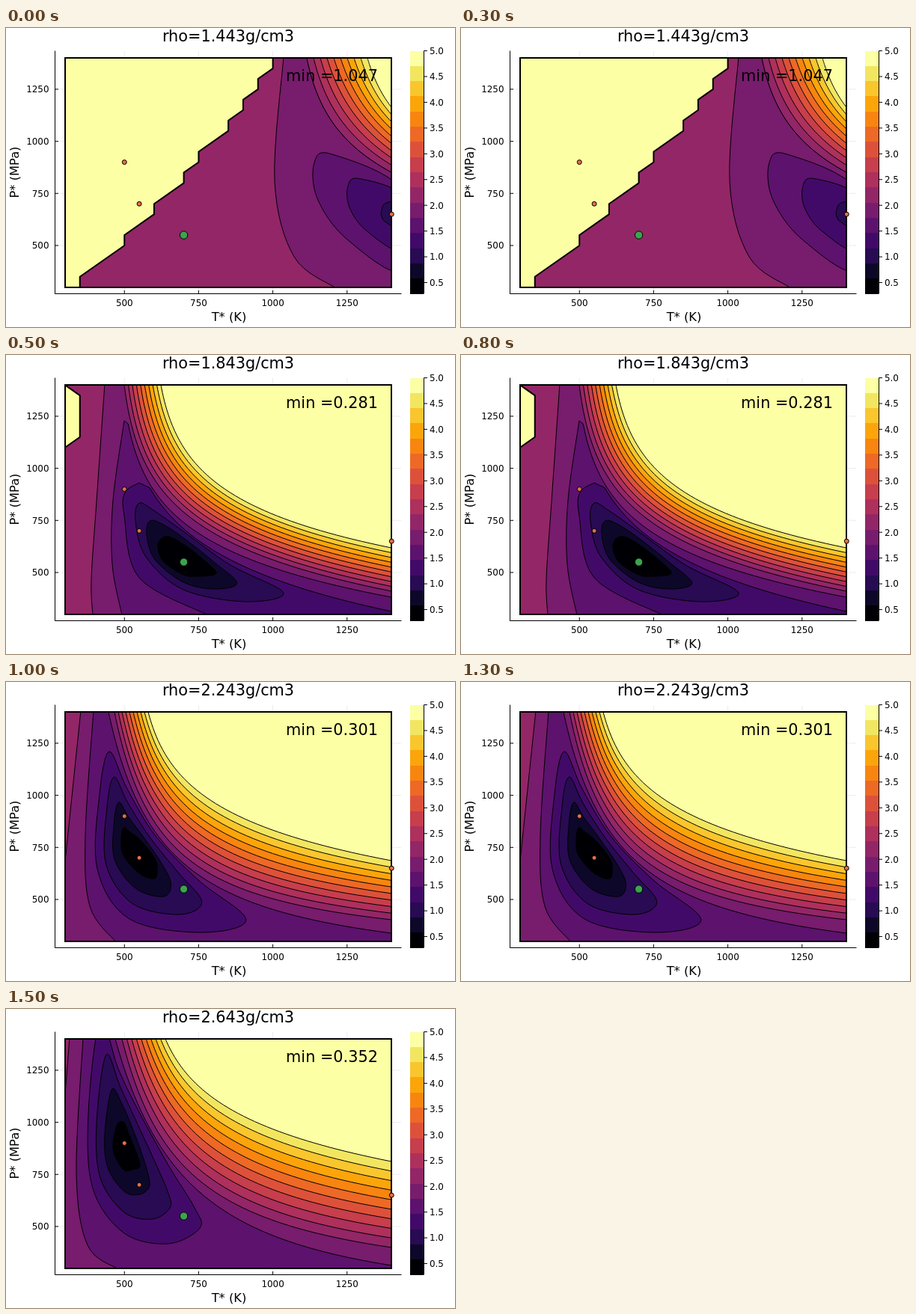
Animation of 600x400 px, one loop 2000 ms. Source, as an HTML page with a canvas:

```html
<!DOCTYPE html>
<html lang="en">
<head>
<meta charset="utf-8">
<title>Density contours</title>
<style>
html, body { margin: 0; width: 100%; height: 100%; overflow: hidden; background: #fff; }
canvas { display: block; width: 600px; height: 400px; }
</style>
</head>
<body>
<canvas id="stage" width="600" height="400"></canvas>
<script>
const ctx = document.getElementById('stage').getContext('2d');
const INFERNO = ['#000004', '#0d0829', '#280b53', '#420a68', '#5d126e', '#781c6d', '#932667', '#ae305c',
  '#c73e4c', '#dd513a', '#ed6925', '#f8850f', '#fca50a', '#fac62d', '#f2e661', '#fcffa4'];
const BASE = 6;
const PLOT = { left: 79, top: 40, right: 515, bottom: 347 };
const OUTSIDE = { x: 530, top: 25, bottom: 360 };
const STEP_MS = 500;

const parse = text => text.split(' ').map(pair => pair.split(',').map(Number));
const mix = (a, b, t) => a + (b - a) * t;
const clamp = (v, lo, hi) => Math.min(hi, Math.max(lo, v));
const xOf = kelvin => 78.9 + (kelvin - 300) * 0.3967;
const yOf = mpa => 346.7 - (mpa - 300) * 0.2787;
const cell = (i, j) => [xOf(300 + 50 * i), yOf(300 + 50 * j)];

// Each ramp is [x at the plot top, y at the right edge, softness, power].
// slopes: left edge of a region and the ramp that bounds it above, from level 5 inward.
// pool: outermost and innermost loop of the minimum; fan: lowest and highest ramp.
const SCENES = [
  {
    rho: '1.443', min: '1.047',
    slopes: [{ edge: '441,348 385,306 359,205 371,38', ramp: [402, 193, 0.13, 0.02] }],
    pool: { count: 3,
      outer: '530,218 436,169 412,180 416,228 455,282 530,325',
      inner: '530,234 508,234 502,243 502,252 508,260 530,270' },
    fan: [[402, 193, 0.13, 0.02], [483, 106, 0.61, 0.02]],
    gap: staircase()
  },
  {
    rho: '1.843', min: '0.281',
    slopes: [
      { edge: '116,348 114,300 121,196 132,38' },
      { edge: '155,348 142,280 143,194 158,88', ramp: [156, 324, 0.02, 0.02] },
      { edge: '270,348 178,298 158,215 159,184 178,171', ramp: [154, 343, 0.025, 0.02] }
    ],
    pool: { count: 3,
      outer: '178,198 199,209 237,236 300,281 371,318 320,330 237,314 187,270 173,222',
      inner: '207,246 218,243 237,253 263,273 281,292 257,296 237,294 211,277 203,258' },
    fan: [[158, 316, 0.028, 0.02], [207, 258, 0.042, 0.02]],
    gap: [cell(-1, 23), cell(0, 22), cell(1, 21), cell(1, 17), cell(0, 16), cell(-1, 15)]
  },
  {
    rho: '2.243', min: '0.301',
    slopes: [
      { edge: '60,430 78,250 100,38' },
      { edge: '147,348 112,300 106,205 117,38', ramp: [137, 336, 0.2, 1] }
    ],
    pool: { count: 4,
      outer: '138,93 162,143 200,206 257,265 321,318 260,335 165,317 122,250 125,150',
      inner: '157,195 165,200 180,212 197,233 202,246 199,263 178,256 157,232 154,210' },
    fan: [[145, 318, 0.176, 1], [190, 239, 0.055, 0.02]]
  },
  {
    rho: '2.643', min: '0.352',
    slopes: [
      { edge: '60,360 79,115 85,38' },
      { edge: '150,348 109,316 94,220 103,38', ramp: [146, 343, 0.4, 1.5] }
    ],
    pool: { count: 4,
      outer: '126,15 150,80 178,138 217,209 252,266 259,293 217,314 158,300 116,240 110,140',
      inner: '149,154 158,152 164,167 171,184 178,203 178,212 168,215 158,216 146,198 143,180' },
    fan: [[155, 319, 0.236, 1], [213, 204, 0.098, 0.02]]
  }
];

// Every riser is one cell high, and the edge climbs diagonally between risers.
function staircase() {
  const risers = [1, 4, 6, 8, 9, 11, 12, 13, 14];
  const steps = risers.flatMap((col, n) => [cell(col, col - 1 + n), cell(col, col + n)]);
  return [cell(-1, -1), cell(1, -1), ...steps, cell(14, 23), cell(-1, 23)];
}

// Catmull-Rom curve through a few key points.
function spline(points, closed = false) {
  const n = points.length;
  const at = i => points[closed ? (i + n) % n : clamp(i, 0, n - 1)];
  const curve = [];
  for (let i = 0; i < (closed ? n : n - 1); i++) {
    const [a, b, c, d] = [at(i - 1), at(i), at(i + 1), at(i + 2)];
    for (let t = 0; t < 1; t += 0.125) {
      curve.push([0, 1].map(k => b[k] + 0.5 * t * (c[k] - a[k]
        + t * (2 * a[k] - 5 * b[k] + 4 * c[k] - d[k] + t * (3 * (b[k] - c[k]) + d[k] - a[k])))));
    }
  }
  return closed ? curve : [...curve, points[n - 1]];
}

// Falls steeply from the plot top and flattens towards the right edge.
function ramp([x0, yEnd, softness, power]) {
  const drop = s => 1 - (1 + s / softness) ** -power;
  const points = [];
  for (let u = 0; u <= 1.01; u += 0.02) {
    const s = 1.03 * u * u;
    points.push([mix(x0, PLOT.right, s), mix(PLOT.top, yEnd, drop(s) / drop(1))]);
  }
  return points;
}

function slope({ edge, ramp: shape }) {
  const left = spline(parse(edge));
  const peak = left[left.length - 1][1];
  const right = shape ? ramp(shape).filter(([, y]) => y >= peak) : [[OUTSIDE.x, OUTSIDE.top]];
  return [...left, ...right, [OUTSIDE.x, OUTSIDE.bottom]];
}

// Long tails that retreat to the left shrink fastest at first.
function poolLoop(outer, inner, t) {
  return spline(outer.map(([x, y], i) => {
    const dx = inner[i][0] - x;
    const power = 1 + clamp(-dx / 120, 0, 0.7);
    return [x + dx * (1 - (1 - t) ** power), mix(y, inner[i][1], t)];
  }), true);
}

function region(points, color, width = 1) {
  ctx.beginPath();
  points.forEach(([x, y]) => ctx.lineTo(x, y));
  ctx.closePath();
  ctx.fillStyle = color;
  ctx.fill();
  ctx.lineWidth = width;
  ctx.stroke();
}

function line(x1, y1, x2, y2, color = '#000') {
  ctx.beginPath();
  ctx.moveTo(x1, y1);
  ctx.lineTo(x2, y2);
  ctx.strokeStyle = color;
  ctx.lineWidth = 1;
  ctx.stroke();
}

function label(text, x, y, size, align = 'center') {
  ctx.font = `${size}px "DejaVu Sans", sans-serif`;
  ctx.textAlign = align;
  ctx.fillStyle = '#000';
  ctx.fillText(text, x, y);
}

function dot(x, y, radius, color) {
  ctx.beginPath();
  ctx.arc(x, y, radius, 0, 2 * Math.PI);
  ctx.fillStyle = color;
  ctx.fill();
  ctx.lineWidth = 1;
  ctx.stroke();
}

function drawAxes() {
  const ticks = [500, 750, 1000, 1250];
  for (const v of ticks) {
    line(xOf(v), 31, xOf(v), 355, 'rgba(0,0,0,.08)');
    line(66, yOf(v), 528, yOf(v), 'rgba(0,0,0,.08)');
  }
  line(65.5, 30.5, 65.5, 356);
  line(65.5, 355.5, 528.5, 355.5);
  for (const v of ticks) {
    line(xOf(v), 355.5, xOf(v), 351);
    line(65.5, yOf(v), 70, yOf(v));
    label(v, xOf(v), 372, 11.9);
    label(v, 57.5, yOf(v) + 4.3, 11.9, 'right');
  }
  label('T* (K)', 298, 392, 16.3);
  ctx.save();
  ctx.translate(16.5, 193);
  ctx.rotate(-Math.PI / 2);
  label('P* (MPa)', 0, 0, 16.3);
  ctx.restore();
}

function drawColorbar() {
  const top = 30.5, bottom = 355.5, band = (bottom - top) / INFERNO.length;
  INFERNO.forEach((color, i) => {
    const y = Math.round(bottom - (i + 1) * band);
    ctx.fillStyle = color;
    ctx.fillRect(540, y, 18, Math.round(bottom - i * band) - y);
  });
  line(558.5, top, 558.5, bottom);
  for (let v = 0.5; v <= 5; v += 0.5) {
    const y = top + (5 - v) * 68.9;
    line(558.5, y, 563, y);
    label(v.toFixed(1), 566, y + 4.3, 11.9, 'left');
  }
}

function drawField({ slopes, pool, fan: [low, high], gap }) {
  const { left, top, right, bottom } = PLOT;
  const box = [left, top, right - left, bottom - top];
  ctx.save();
  ctx.beginPath();
  ctx.rect(...box);
  ctx.clip();
  ctx.strokeStyle = '#000';
  ctx.lineJoin = 'round';
  ctx.fillStyle = INFERNO[BASE];
  ctx.fillRect(...box);

  let level = BASE - 1;
  for (const item of slopes) region(slope(item), INFERNO[level--]);
  const [outer, inner] = [parse(pool.outer), parse(pool.inner)];
  for (let i = 0; i < pool.count; i++) {
    region(poolLoop(outer, inner, i / (pool.count - 1)), INFERNO[level--]);
  }
  for (let k = 0; k < 10; k++) {
    const shape = low.map((v, i) => mix(v, high[i], k / 9));
    region([...ramp(shape), [OUTSIDE.x, OUTSIDE.top], [shape[0], OUTSIDE.top]], INFERNO[BASE + k]);
  }
  if (gap) region(gap, INFERNO[15], 2);
  ctx.restore();

  ctx.strokeStyle = '#000';
  ctx.lineWidth = 2;
  ctx.strokeRect(...box);
}

function draw(scene) {
  ctx.fillStyle = '#fff';
  ctx.fillRect(0, 0, 600, 400);
  drawAxes();
  drawColorbar();
  drawField(scene);
  for (const [kelvin, mpa] of [[500, 900], [550, 700], [1400, 650]]) dot(xOf(kelvin), yOf(mpa), 3, '#e26f46');
  dot(xOf(700), yOf(550), 5.2, '#3da44d');
  label(`rho=${scene.rho}g/cm3`, 297, 18, 20.8);
  label(`min =${scene.min}`, 435.5, 71, 20.8);
}

function tick() {
  draw(SCENES[Math.floor(performance.now() / STEP_MS) % SCENES.length]);
  requestAnimationFrame(tick);
}
tick();
</script>
</body>
</html>
```
